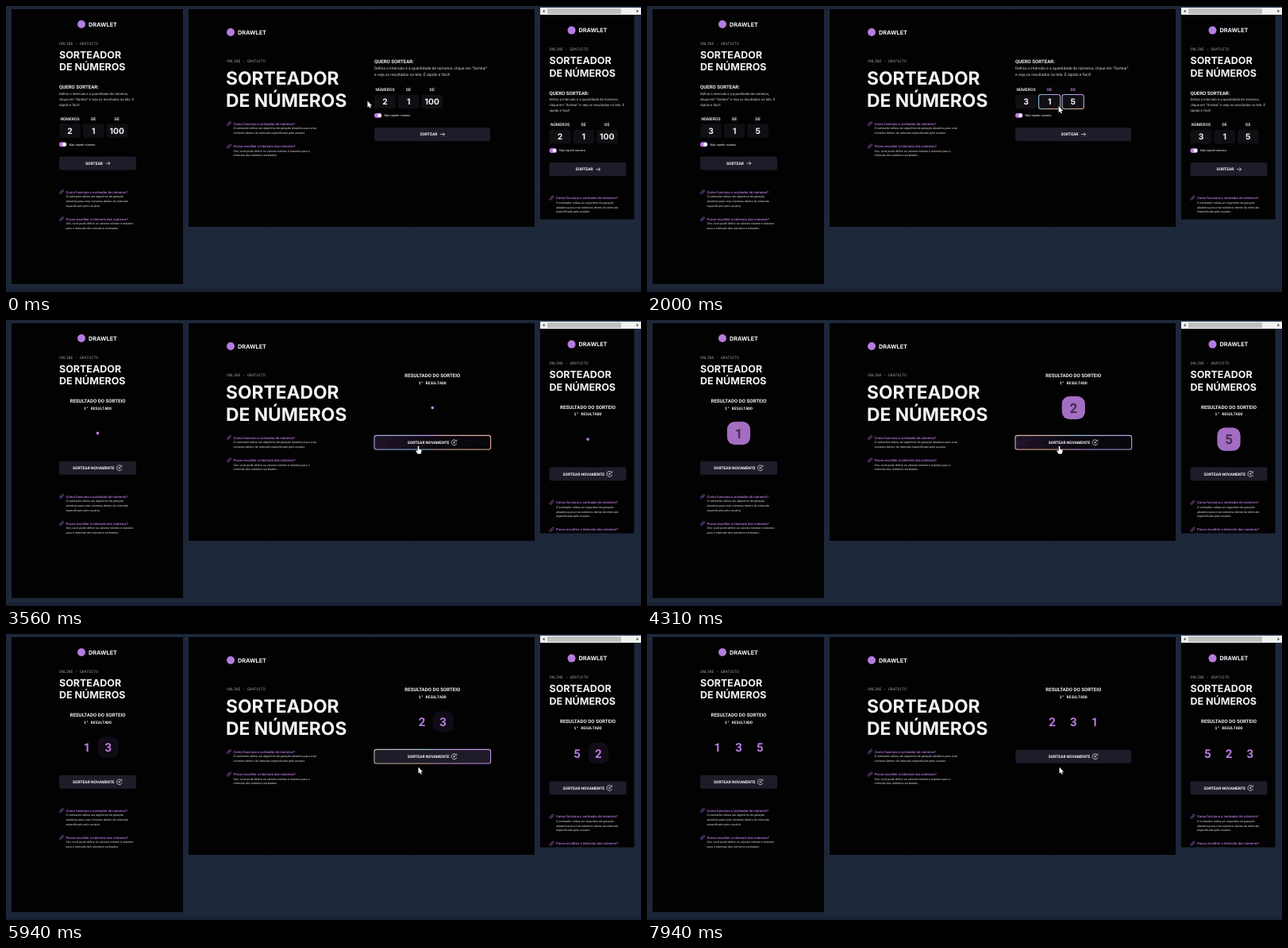
An HTML page with a canvas for the animation above (8000 ms loop, 800x360 px).

```html
<!DOCTYPE html>
<html lang="pt-BR">
<head>
<meta charset="utf-8">
<title>Sorteador de números</title>
<style>
html, body { margin: 0; width: 100%; height: 100%; overflow: hidden; background: #1d273a; }
canvas { display: block; width: 800px; height: 360px; }
</style>
</head>
<body>
<canvas></canvas>
<script>
const LOOP = 8000, SWITCH = 3300, REVEAL = 3500, STEP = 1300;
const SANS = 'Roboto, sans-serif', DISPLAY = 'Inter, sans-serif', MONO = '"Noto Sans Mono", monospace';
const PURPLE = '#ba7bdf', WHITE = '#f4f4f6', BUTTON = '#1f1b28';
const canvas = document.querySelector('canvas');
const dpr = window.devicePixelRatio || 1;
canvas.width = 800 * dpr;
canvas.height = 360 * dpr;
const ctx = canvas.getContext('2d');
ctx.textRendering = 'geometricPrecision';
let now = 0;

// Piecewise linear value through [time, value] points.
function track(t, points) {
  if (t <= points[0][0]) return points[0][1];
  for (let i = 1; i < points.length; i++) {
    const [t0, a] = points[i - 1], [t1, b] = points[i];
    if (t < t1) return a + (b - a) * (t - t0) / (t1 - t0);
  }
  return points[points.length - 1][1];
}

// y is the middle of the capital letters.
function text(str, x, y, size, { weight = 400, color = WHITE, font = SANS, align = 'left' } = {}) {
  ctx.font = `${weight} ${size}px ${font}`;
  ctx.fillStyle = color;
  ctx.textAlign = align;
  ctx.fillText(str, x, y + size * 0.36);
}

function lines(list, x, y, step, size, color) {
  list.forEach((line, i) => text(line, x, y + i * step, size, { color }));
}

function box(x, y, w, h, r, fill) {
  ctx.beginPath();
  ctx.roundRect(x, y, w, h, r);
  ctx.fillStyle = fill;
  ctx.fill();
}

function stroke(path, color, width = 0.7) {
  ctx.strokeStyle = color;
  ctx.lineWidth = width;
  ctx.stroke(new Path2D(path));
}

function glow(x, y, w, h, r) {
  const turn = 0.5 + (now - 5000) * 0.00055;
  const ring = ctx.createConicGradient(turn * 2 * Math.PI, x + w / 2, y + h / 2);
  ['#c38fe8', '#e6b08c', '#86c2dc', '#c38fe8'].forEach((c, i) => ring.addColorStop(i / 3, c));
  ctx.beginPath();
  ctx.roundRect(x - 0.3, y - 0.3, w + 0.6, h + 0.6, r);
  ctx.strokeStyle = ring;
  ctx.lineWidth = 1.1;
  ctx.stroke();
}

function panel(x, y, w, h, seed) {
  box(x, y, w, h, 0, '#020203');
  const random = () => (seed = seed * 16807 % 2147483647) / 2147483647;
  ctx.fillStyle = '#121214';
  for (let i = 0; i < 45; i++) {
    ctx.fillRect(x + random() * w, y + h * (1 - random() ** 1.6), 1, 1);
  }
}

function brand(x, y) {
  ctx.beginPath();
  ctx.arc(x, y, 5, 0, 7);
  ctx.fillStyle = '#b57ce0';
  ctx.fill();
  text('DRAWLET', x + 9, y, 7.3, { weight: 700, font: DISPLAY });
}

function heading(x, y, size, gap) {
  text('SORTEADOR', x, y, size, { weight: 700, font: DISPLAY });
  text('DE NÚMEROS', x, y + gap, size, { weight: 700, font: DISPLAY });
}

function tagline(x, y) {
  text('ONLINE - GRATUITO', x, y, 4.8, { color: '#a0a0a6', font: MONO });
}

function question(x, y, title, answer) {
  ctx.save();
  ctx.translate(x + 3, y);
  ctx.rotate(-Math.PI / 4);
  for (const dx of [-3.2, 0.2]) {
    ctx.beginPath();
    ctx.roundRect(dx, -1.2, 3, 2.4, 1.2);
    ctx.strokeStyle = '#9a62c0';
    ctx.lineWidth = 0.7;
    ctx.stroke();
  }
  ctx.restore();
  text(title, x + 8.5, y, 4.25, { weight: 500, color: PURPLE });
  lines(answer, x + 8.5, y + 6, 5.7, 3.73, '#d6d6da');
}

function faq(x, y, gap, first, second) {
  question(x, y, 'Como funciona o sorteador de números?', first);
  question(x, y + gap, 'Posso escolher o intervalo dos números?', second);
}

function button(x, y, w, hover, focus) {
  let fill = BUTTON;
  if (hover) {
    fill = ctx.createLinearGradient(x, 0, x + w, 0);
    fill.addColorStop(0, '#21142b');
    fill.addColorStop(0.5, '#0b080f');
    fill.addColorStop(1, '#09070c');
  }
  box(x, y - 8.5, w, 17, 2.5, fill);
  if (hover || focus) glow(x, y - 8.5, w, 17, 2.5);
}

function form(x, y, w, active, hover) {
  const values = [now < 700 ? '2' : '3', '1', now < 1450 ? '100' : '5'];
  ['NÚMEROS', 'DE', 'DE'].forEach((label, i) => {
    const cx = x + 13.5 + i * 29.6, on = active.includes(i);
    text(label, cx, y - 15, 5.1, { weight: 700, align: 'center', color: on ? PURPLE : '#dcdce0' });
    box(cx - 13.3, y - 8.7, 26.6, 17.4, 2.5, '#100f13');
    if (on) glow(cx - 13.3, y - 8.7, 26.6, 17.4, 2.5);
    text(values[i], cx, y, 10.3, { weight: 700, font: DISPLAY, align: 'center' });
  });
  box(x, y + 14.3, 9.4, 6, 3, PURPLE);
  ctx.beginPath();
  ctx.arc(x + 6.5, y + 17.3, 2.2, 0, 7);
  ctx.fillStyle = '#fff';
  ctx.fill();
  text('Não repetir número', x + 12.5, y + 17.3, 3.85);

  const by = y + 41, cx = x + w / 2;
  button(x, by, w, hover, false);
  text('SORTEAR', cx - 15.5, by, 5, { weight: 700 });
  stroke(`M${cx + 10} ${by}h5.6m-2.2 -2.2l2.2 2.2l-2.2 2.2`, WHITE);
}

function tile(digit, x, y, p) {
  const scale = track(p, [[40, 0], [200, 0.96], [700, 1.13], [900, 1.12], [1140, 1]]);
  const fade = track(p, [[700, 1], [900, 0.72], [1140, 0.08], [1250, 0]]);
  const ink = track(p, [[500, 0], [850, 1]]);
  const tint = track(p, [[900, 0.3], [1120, 1]]);
  ctx.save();
  ctx.translate(x, y);
  ctx.scale(scale, scale);
  ctx.globalAlpha = fade;
  box(-13, -13, 26, 26, 8.5, '#c282e6');
  ctx.globalAlpha = ink;
  text(digit, 0, 0, 15, {
    weight: 600, align: 'center', color: `rgb(${186 * tint},${123 * tint},${223 * tint})`
  });
  ctx.restore();
}

function result(cx, y, w, digits, hover, focus) {
  text('RESULTADO DO SORTEIO', cx, y, 6.15, { weight: 700, align: 'center' });
  text('1° RESULTADO', cx, y + 9, 4.85, { weight: 600, font: MONO, align: 'center' });
  const count = Math.max(0, Math.min(3, Math.floor((now - REVEAL) / STEP) + 1));
  for (let i = 0; i < count; i++) {
    tile(digits[i], cx + (i - (count - 1) / 2) * 26.7, y + 40.5, now - REVEAL - i * STEP);
  }
  const by = y + 84.2;
  button(cx - w / 2, by, w, hover, focus);
  text('SORTEAR NOVAMENTE', cx - 31.5, by, 4.95, { weight: 700 });
  ctx.save();
  ctx.translate(cx + 27.3, by);
  ctx.beginPath();
  ctx.arc(0, 0, 3.3, 0.3, 5.5);
  ctx.strokeStyle = WHITE;
  ctx.lineWidth = 0.7;
  ctx.stroke();
  stroke('M3.2 -3.6v2h-2M0 -1.6v3.2M-1.6 0h3.2', WHITE, 0.6);
  ctx.restore();
}

function mobile(digits) {
  brand(95, 23);
  tagline(67, 47);
  heading(67, 61, 12.5, 15.6);
  const done = now >= SWITCH;
  if (done) {
    result(115.5, 102, 97, digits, false, false);
  } else {
    text('QUERO SORTEAR:', 67, 102, 6.1, { weight: 700 });
    lines(['Defina o intervalo e a quantidade de números,',
      'clique em “Sortear” e veja os resultados na tela. É',
      'rápido e fácil!'], 67, 110, 7, 4.3, '#d6d6da');
    form(67, 157, 97, [], false);
  }
  faq(67, done ? 222 : 234, 34,
    ['O sorteador utiliza um algoritmo de geração',
      'aleatória para criar números dentro do intervalo',
      'especificado pelo usuário.'],
    ['Sim, você pode definir os valores mínimo e máximo',
      'para o intervalo dos números sorteados.']);
}

function desktop() {
  panel(230, 4, 436, 274, 77);
  brand(283, 33);
  tagline(278, 69.5);
  heading(277, 90.5, 22.8, 28.7);
  faq(278, 148, 28.4,
    ['O sorteador utiliza um algoritmo de geração aleatória para criar',
      'números dentro do intervalo especificado pelo usuário.'],
    ['Sim, você pode definir os valores mínimo e máximo para o',
      'intervalo dos números sorteados.']);
  if (now >= SWITCH) {
    result(537.3, 70, 146, ['2', '3', '1'], now < 5350, now < 7500);
    return;
  }
  text('QUERO SORTEAR:', 464, 70, 6.1, { weight: 700 });
  lines(['Defina o intervalo e a quantidade de números, clique em “Sortear”',
    'e veja os resultados na tela. É rápido e fácil!'], 464, 78.5, 7.6, 4.93, '#d6d6da');
  const active = [];
  if (now > 300 && now < 1200) active.push(0);
  if (now > 1850 && now < 2250) active.push(1);
  if (now > 1200 && now < 2900) active.push(2);
  form(464, 120.5, 146, active, now > 2550);
}

function narrow() {
  box(673, 2, 127, 9, 0, '#f1f1f1');
  box(682, 3, 93, 7, 0, '#c1c1c1');
  ctx.fillStyle = '#505050';
  ctx.fill(new Path2D('M676 6.5l2.5 -2v4zM797 6.5l-2.5 -2v4z'));
  panel(673, 11, 118.5, 257.5, 1234);
  ctx.save();
  ctx.beginPath();
  ctx.rect(673, 11, 118.5, 257.5);
  ctx.clip();
  ctx.translate(617.5, 7.6);
  mobile(['5', '2', '3']);
  ctx.restore();
}

function cursor() {
  const x = track(now, [[60, 455.5], [450, 478], [950, 478], [1300, 537], [1650, 537], [1950, 518.5], [2700, 519.5]]);
  const y = track(now, [[60, 119.5], [450, 122], [1650, 122], [1950, 126], [2150, 126], [2700, 158.5],
    [5200, 158.5], [5500, 167.5]]);
  const hand = now > 2550 && now < 5350;
  const shape = new Path2D(hand
    ? 'M-.8 .8Q0 -.6 .8 .8V4L4 4.8V7.5L3 10H-1L-3.2 6.5Q-3 5.2 -.8 6.3Z'
    : 'M0 0V8L1.8 6.4L3 9.2L4.3 8.6L3.1 6H5.6Z');
  ctx.save();
  ctx.translate(x, y);
  ctx.fillStyle = '#fff';
  ctx.strokeStyle = '#000';
  ctx.lineWidth = 0.8;
  ctx.stroke(shape);
  ctx.fill(shape);
  ctx.restore();
}

function draw() {
  now = performance.now() % LOOP;
  ctx.setTransform(dpr, 0, 0, dpr, 0, 0);
  box(0, 0, 800, 360, 0, '#1d273a');
  box(0, 356, 800, 4, 0, '#182134');
  panel(7, 4, 216, 346, 4321);
  mobile(['1', '3', '5']);
  desktop();
  narrow();
  cursor();
  requestAnimationFrame(draw);
}
draw();
</script>
</body>
</html>
```
